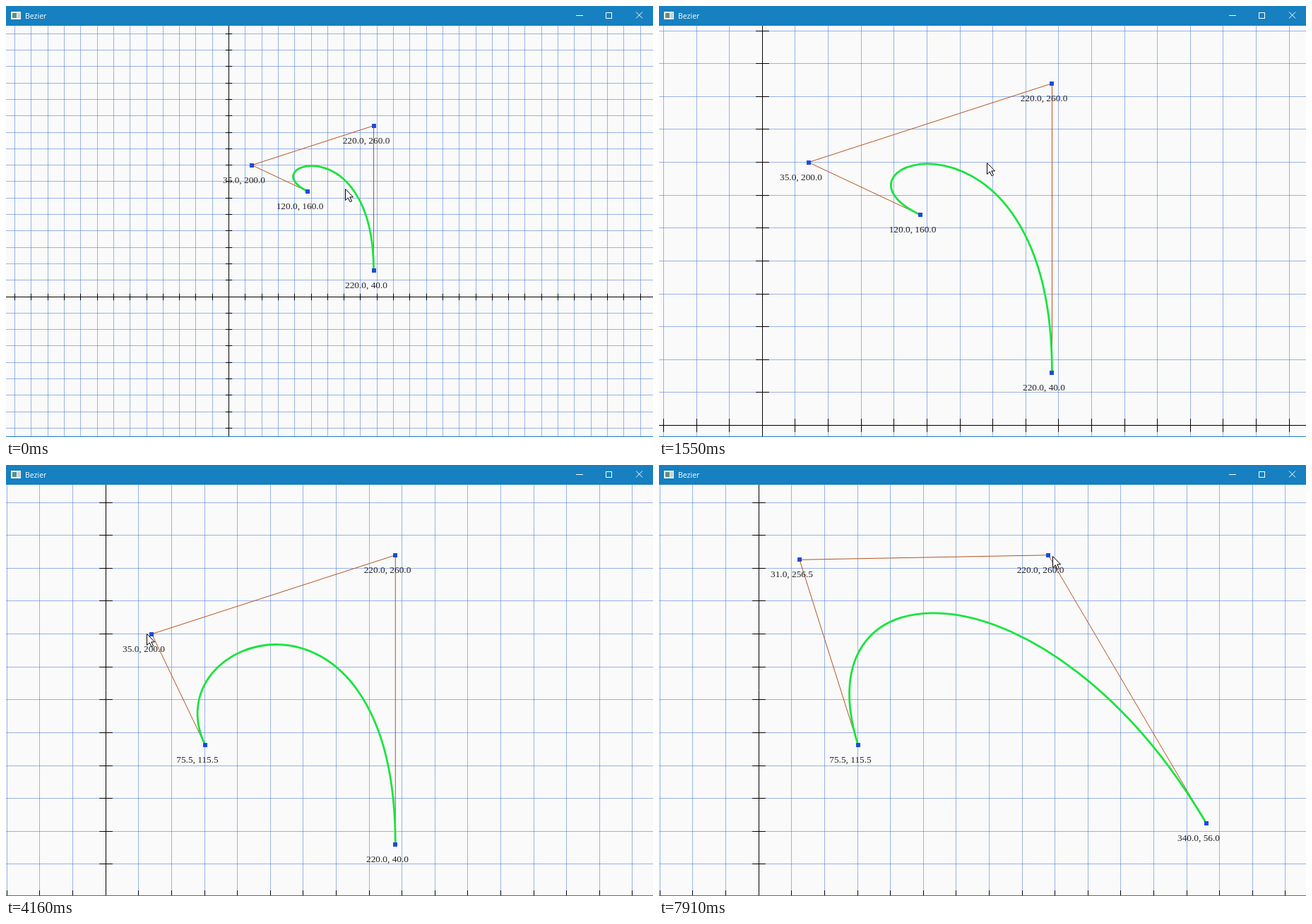
Animation of 916x611 px, one loop 8000 ms. Source, as an HTML page with a canvas:

```html
<!DOCTYPE html>
<html>
<head>
<meta charset="utf-8">
<title>Bezier</title>
<style>
html, body { margin: 0; width: 100%; height: 100%; overflow: hidden; }
canvas { display: block; }
</style>
</head>
<body>
<canvas id="stage" width="916" height="611"></canvas>
<script>
const ctx = document.getElementById('stage').getContext('2d');
const W = 916, H = 611, BAR = 28, CELL = 23.3, SCALE = 0.932, BLUE = '#1680c0';
const LOOP = 8000, TICK = 138.5, REST = 150;

// Each gesture starts with the pointer "at" a spot; the pointer glides there from the one before.
const gestures = [
  { start: 10, end: 550, at: [484.5, 255], pan: [-35.3, 13] },
  { start: 700, end: 960, at: [449.2, 268], pan: [25, -16.8] },
  { start: 1240, end: 1520, at: [464, 222], zoom: 2 },
  { start: 1930, end: 2210, at: [464, 222], pan: [4.2, -5] },
  { start: 2217, end: 2350, at: [468.5, 216.5], pan: [-9.4, 23] },
  { start: 3040, end: 3600, at: [365, 314], drag: 0, to: [75.5, 115.5] },
  { start: 4156, end: 4900, at: [199, 239], drag: 1, to: [31, 256.5] },
  { start: 5680, end: 7480, at: [551.5, 537.5], drag: 3, to: [340, 56], power: 3 },
  { start: 7890, end: LOOP, at: [557, 129] },
];

const clamp = v => Math.min(1, Math.max(0, v));
const mix = (a, b, f) => a.map((v, i) => v + (b[i] - v) * f);
const add = (a, b, f = 1) => a.map((v, i) => v + b[i] * f);
const snap = v => Math.floor(v) + 0.5;

function stateAt(t) {
  const s = {
    origin: [315.5, 412], zoom: 1, pointer: [480, 259], panning: false,
    points: [[120, 160], [35, 200], [220, 260], [220, 40]],
  };
  let free = 0;
  for (const g of gestures) {
    if (t < g.start) {
      s.pointer = mix(s.pointer, g.at, clamp((t - free) / (g.start - free)));
      break;
    }
    const f = clamp((t - g.start) / (g.end - g.start)) ** (g.power || 1);
    s.pointer = g.at;
    s.panning = Boolean(g.pan) && t < g.end + REST * 1.7;
    if (g.pan) {
      s.origin = add(s.origin, g.pan, f);
      s.pointer = add(g.at, g.pan, f);
    } else if (g.zoom) {
      s.zoom = 1 + (g.zoom - 1) * f;
      s.origin = mix(g.at, s.origin, s.zoom);
    } else if (g.to) {
      const from = s.points[g.drag], unit = SCALE * s.zoom;
      const moved = mix(from, g.to, f);
      s.points[g.drag] = moved;
      s.pointer = add(g.at, [(moved[0] - from[0]) * unit, (from[1] - moved[1]) * unit]);
    }
    free = g.end + REST;
  }
  return s;
}

const arrow = new Path2D('M0 0V16L3.8 12.4L6.6 18.3L9 17.2L6.3 11.4H11Z');
const cross = new Path2D();
for (let i = 0; i < 4; i++) {
  const c = [1, 0, -1, 0][i], s = [0, 1, 0, -1][i];
  for (const [x, y] of [[-1.5, -1.5], [-1.5, -6], [-4, -6], [0, -10], [4, -6], [1.5, -6]])
    cross.lineTo(x * c - y * s, x * s + y * c);
}
cross.closePath();

function line(...xy) {
  ctx.beginPath();
  for (let i = 0; i < xy.length; i += 2) ctx.lineTo(xy[i], xy[i + 1]);
  ctx.stroke();
}

function rect(color, ...box) {
  ctx.fillStyle = color;
  ctx.fillRect(...box);
}

function gridStops(origin, cell, from, to) {
  const stops = [];
  for (let i = Math.ceil((from - origin) / cell); origin + i * cell < to; i++)
    stops.push(snap(origin + i * cell));
  return stops;
}

function drawGrid({ origin: [ox, oy], zoom }) {
  const cell = CELL * zoom, tick = 4.7 * zoom, ax = snap(ox), ay = snap(oy);
  const columns = gridStops(ox, cell, 0, W), rows = gridStops(oy, cell, BAR, H);
  ctx.lineWidth = 1;
  ctx.strokeStyle = 'rgba(65, 115, 215, .53)';
  columns.forEach(x => line(x, BAR, x, H));
  rows.forEach(y => line(0, y, W, y));
  ctx.strokeStyle = '#000';
  line(ax, BAR, ax, H);
  line(0, ay, W, ay);
  columns.forEach(x => line(x, ay - tick, x, ay + tick));
  rows.forEach(y => line(ax - tick, y, ax + tick, y));
}

function drawCurve({ origin: [ox, oy], zoom, points }) {
  const values = points.map(p => p.map(v => Math.round(v * 2) / 2));
  const unit = SCALE * zoom;
  const pos = values.map(([x, y]) => [ox + x * unit, oy - y * unit]);
  ctx.strokeStyle = '#b5531f';
  ctx.lineWidth = 1;
  line(...pos.flat());
  ctx.strokeStyle = '#1ae43e';
  ctx.lineWidth = 2.8;
  ctx.beginPath();
  ctx.moveTo(...pos[0]);
  ctx.bezierCurveTo(...pos.slice(1).flat());
  ctx.stroke();
  ctx.font = '13.33px "Liberation Serif", serif';
  ctx.textAlign = 'center';
  pos.forEach(([x, y], i) => {
    rect('#1c4cd8', Math.round(x - 3), Math.round(y - 3), 6, 6);
    ctx.fillStyle = '#222';
    ctx.fillText(values[i].map(v => v.toFixed(1)).join(', '), Math.round(x) - 11, Math.round(y) + 25);
  });
}

function drawPointer({ pointer, panning }) {
  const shape = panning ? cross : arrow;
  ctx.save();
  ctx.translate(...pointer.map(snap));
  ctx.fillStyle = '#fff';
  ctx.strokeStyle = '#000';
  ctx.lineWidth = 1;
  ctx.fill(shape);
  ctx.stroke(shape);
  ctx.restore();
}

function drawWindow() {
  rect(BLUE, 0, 0, W, BAR);
  rect(BLUE, 0, H - 1, W, 1);
  rect('#eef0f0', 7, 8, 14, 11);
  rect('#5c9180', 9, 10, 6, 7);
  rect('#c9d3d6', 16, 10, 4, 7);
  ctx.fillStyle = ctx.strokeStyle = '#fff';
  ctx.lineWidth = 1;
  ctx.font = '10.5px "Open Sans", sans-serif';
  ctx.textAlign = 'left';
  ctx.fillText('Bezier', 27, 17.5);
  line(807, 13.5, 817, 13.5);
  ctx.strokeRect(849.5, 9.5, 8, 8);
  line(892, 8.5, 901, 17.5);
  line(901, 8.5, 892, 17.5);
}

function draw() {
  const t = performance.now() % LOOP;
  const state = stateAt(Math.floor(t / TICK) * TICK);
  rect('#fafafa', 0, 0, W, H);
  drawGrid(state);
  drawCurve(state);
  drawWindow();
  drawPointer(state);
  requestAnimationFrame(draw);
}
draw();
</script>
</body>
</html>
```
